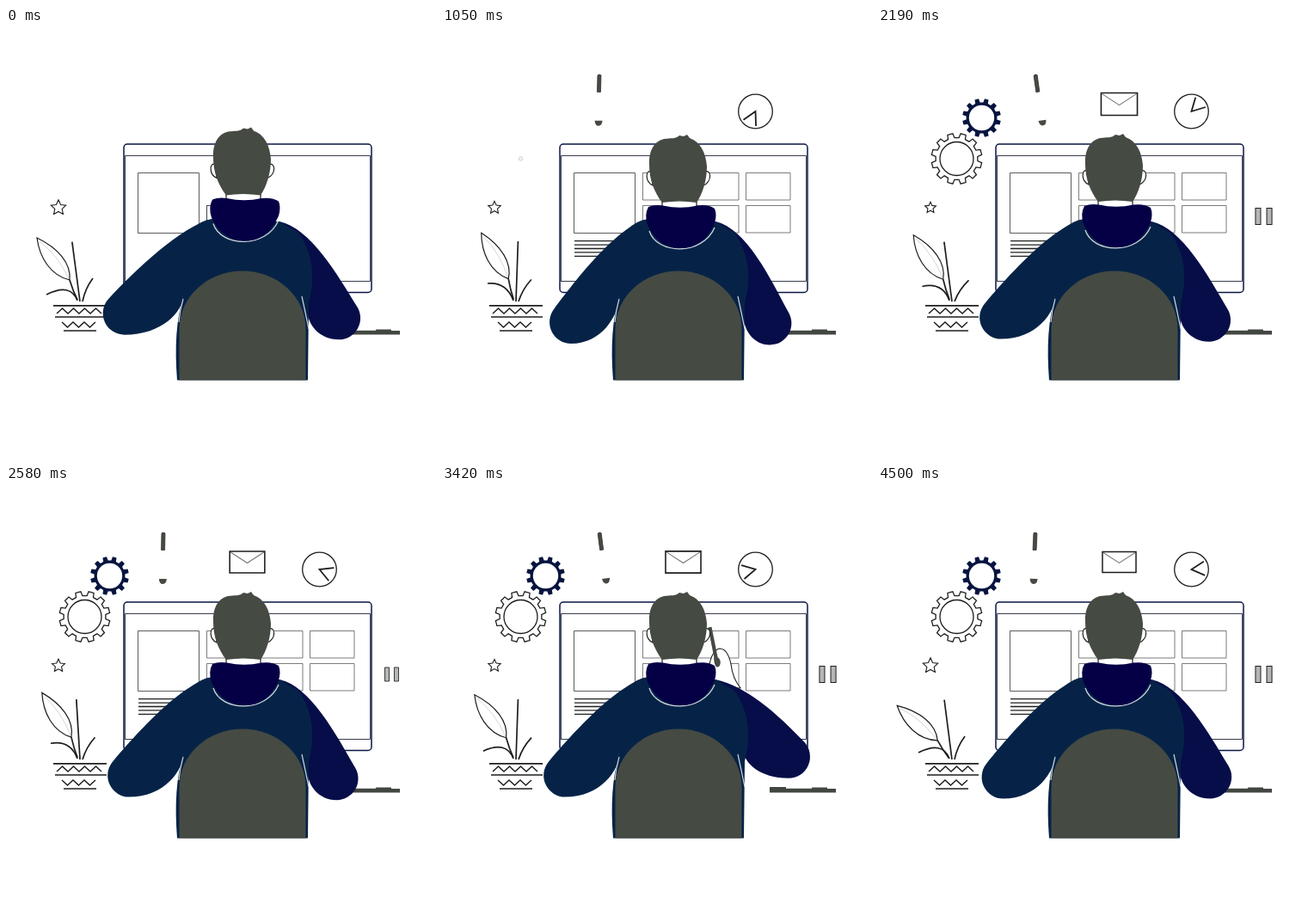
An HTML page with a canvas for the animation above (4.53 s loop, 500 by 500 pixels).

```html
<!DOCTYPE html>
<html lang="en">
<head>
<meta charset="utf-8">
<title>Working at a desk</title>
<style>
  html, body { margin: 0; width: 100%; height: 100%; overflow: hidden; background: #fff; }
  canvas { display: block; }
</style>
</head>
<body>
<canvas id="stage" width="500" height="500"></canvas>
<script>
const ctx = document.getElementById('stage').getContext('2d');
const LOOP = 4530, STEP = 30, RAD = Math.PI / 180;
const INK = '#1c1f1e', GREY = '#454a43', NAVY = '#062347', HOOD = '#050046', SLEEVE = '#060d48', SEAM = '#cdd5de';

const clamp = x => Math.max(0, Math.min(1, x));
const smooth = x => { x = clamp(x); return x * x * (3 - 2 * x); };
const lerp = (a, b, k) => a + (b - a) * k;
// Rises and falls between 0 and 1; shared by everything that breathes
const pulse = t => Math.sin(Math.PI * t / 1485) ** 2;
const popIn = (t, start) => smooth((t - start) / 280);

// Eased value through [time, value] pairs
function at(t, ...keys) {
  const i = keys.findIndex(k => k[0] > t);
  if (i < 0) return keys[keys.length - 1][1];
  if (i === 0) return keys[0][1];
  const [t0, a] = keys[i - 1], [t1, b] = keys[i];
  return lerp(a, b, smooth((t - t0) / (t1 - t0)));
}

function draw(d, { fill, stroke, width = 1.2 }) {
  const path = new Path2D(d);
  if (fill) { ctx.fillStyle = fill; ctx.fill(path); }
  if (stroke) { ctx.strokeStyle = stroke; ctx.lineWidth = width; ctx.stroke(path); }
}
const line = (d, width = 1.7, stroke = INK) => draw(d, { stroke, width });
const box = (x, y, w, h) => `M${x} ${y}h${w}v${h}h${-w}z`;
const circle = r => `M${r} 0a${r} ${r} 0 1 1 ${-2 * r} 0a${r} ${r} 0 1 1 ${2 * r} 0z`;
const polygon = points => 'M' + points.join('L') + 'Z';
const polar = (r, angle) => [r * Math.sin(angle), -r * Math.cos(angle)];
const zigzag = (x, y, count, rise) =>
  `M${x} ${y}` + Array.from({ length: count }, (_, i) => `l6.5 ${i % 2 ? -rise : rise}`).join('');

function place(x, y, angle, scale, paint) {
  if (scale <= 0) return;
  ctx.save();
  ctx.translate(x, y);
  ctx.rotate(angle * RAD);
  ctx.scale(scale, scale);
  paint();
  ctx.restore();
}

function monitor(t) {
  ctx.beginPath();
  ctx.roundRect(137, 135, 288, 172.5, 4);
  ctx.strokeStyle = '#0a1645';
  ctx.lineWidth = 1.5;
  ctx.stroke();
  line('M138.5 294V148.5H423.5V294.5H138', .9, '#222638');
  line(box(153.5, 168.5, 71, 70), .8, '#333');

  // Cards fan out from the lower left one
  const spread = smooth(t / 700);
  for (let row = 0; row < 2; row++)
    for (let col = 0; col < 3; col++)
      line(box(233.5 + 60 * col * spread, 206.5 - 38 * (1 - row) * spread, 51.5, 31.5), .7, '#444');

  for (let i = 0; i < 5; i++) {
    const grown = clamp((t - 342 - 78 * i) / 300);
    if (grown) line(`M154 ${247.7 + 4.4 * i}h${51 * grown}`, 1.3);
  }
}

function plant(t) {
  const tilt = at(t, [0, 0], [600, 11.5], [1470, 3.4], [2970, 4.6], [3870, -1.8], [4500, -11.5]);
  place(86, 318, tilt, 1, () => {
    draw('M-50-74C-47-51-34-30-12-25C-10-44-25-62-50-74Z', { fill: '#fff', stroke: INK });
    line('M-47-70Q-26-54-13-27', .6, '#bbb');
    line('M-12-25Q-8-12-3-2');
  });
  place(86, 318, 2 - 9.5 * Math.cos(Math.PI * t / 2215) ** 4, 1, () => line('M0 0V-70'));
  place(89, 318, 10 * pulse(t), 1, () => line('M0 0Q3-15 12-27'));
  const raised = smooth(tilt / 6);
  line(`M${47 + 6 * raised} ${310 - 13 * raised}Q75 ${296 - raised} 83 317`);

  line('M55 322.8H117M57 336H117M67 352H105');
  line(zigzag(59, 332, 8, -6) + zigzag(65, 342, 6, 6), 1.5);
}

function star(t) {
  const r = 9.2 - 2.5 * pulse(t);
  place(61, 209, 0, 1, () =>
    line(polygon(Array.from({ length: 10 }, (_, i) => polar(i % 2 ? r * .48 : r, i * 36 * RAD))), 1.1));
}

function gear(outer, root, teeth = 12) {
  const points = [];
  for (let i = 0; i < teeth; i++)
    for (const f of [-.3, -.2, .2, .3])
      points.push(polar(Math.abs(f) < .25 ? outer : root, (i + .5 + f) * 2 * Math.PI / teeth));
  return polygon(points);
}

function icons(t) {
  place(91.5, 152, 0, popIn(t, 1000), () => line(gear(29.5, 24.5) + circle(19.5), 1.3));
  place(120.5, 104.5, 0, popIn(t, 1600), () => {
    draw(gear(22.5, 18), { fill: '#06143f' });
    draw(circle(14.7), { fill: '#fff' });
  });

  place(364.5, 97, 0, popIn(t, 230), () => {
    line(circle(19.8), 1.3);
    place(0, 0, 100 + .1736 * (t - 600), 1, () => line('M0-17V0L14.3-9.3', 1.8));
  });

  const swing = at(t, [1470, 1], [2190, -8.5], [2970, 9.8], [3420, -8], [3870, 10], [4500, 2]);
  place(183, 54, swing, popIn(t, 780), () => {
    draw('M-2 1Q0-1 2 1L1.8 20.5H-2.2Z', { fill: GREY, stroke: '#30332f', width: .8 });
    draw('M-4.5 54H4.5Q4 60 0 60Q-4 60-4.5 54Z', { fill: GREY });
  });

  place(280.5, 88.5, 0, popIn(t, 1720) * (1 + .08 * pulse(t)), () => {
    line('M-18.5-11L0 1L18.5-11', 1, '#777');
    line(box(-19.5, -12, 39, 24), 1.5);
  });

  const beat = .88 + .13 * Math.cos(2 * Math.PI * (t - 2240) / 1155);
  place(448.5, 219, 0, popIn(t, 1850) * beat, () =>
    draw(box(-9.5, -9.5, 6, 19) + box(3.5, -9.5, 6, 19), { fill: '#b5b7b5', stroke: INK, width: 1 }));
}

function tablet() {
  draw('M381 350h19v1.8h30v-1.2h18v1.4h10v4.6h-77z', { fill: '#424741' });
}

function hand(t) {
  const drop = at(t, [2450, 85], [2970, 0], [3870, -5], [4280, 85]);
  if (drop >= 85) return;
  const lean = smooth((t - 2970) / 900);
  place(324 - 9 * lean, 205 + drop, -12 * lean, 1, () => {
    draw('M-10 35V7C-7-3-2-13 5-13C12-12 15-3 16 7C16 17 18 26 24 35Z', { fill: '#fff', stroke: INK, width: 1.1 });
    line('M-4-39L0 4', 4.2, GREY);
    draw('M-3-3Q4-5 4 3Q3 9-1 8Q-4 5-3-3Z', { fill: GREY });
  });
}

// Upper arm from shoulder (sx, sy) to a round elbow, back to the armpit; side is -1 left, 1 right
function arm(side, sx, sy, angle, reach, pitX, pitY, fill) {
  const r = 25, cos = side * Math.cos(angle * RAD), sin = Math.sin(angle * RAD);
  const ex = sx + reach * cos, ey = sy + reach * sin, low = ey + r;
  const ox = ex + side * r * sin, oy = ey - side * r * cos;
  pitY ??= ey - 6;
  draw(`M${sx} ${sy}C${sx + side * 36} ${sy + 8} ${ox - 45 * cos} ${oy - 45 * sin} ${ox} ${oy}
    A${r} ${r} 0 0 ${side > 0 ? 1 : 0} ${ex} ${low}
    C${lerp(ex, pitX, .65)} ${low} ${pitX} ${lerp(pitY, low, .4)} ${pitX} ${pitY}L${sx} 300Z`, { fill });
}

function person(t) {
  const bob = at(t, [0, -7.5], [600, 2], [1470, 0]);
  const left = at(t, [0, 47], [600, 55], [1470, 51.5], [2190, 49.8], [3870, 49.8], [4500, 51]);
  const right = at(t, [0, 58.4], [600, 65], [1470, 59], [2600, 60], [3700, 44], [3870, 44], [4320, 59]);

  arm(1, 318, 225, right, 91 + .7 * right, 351, undefined, SLEEVE);
  arm(-1, 240, 222, left, 150, 206, 311, NAVY);
  draw('M199 409.5C196 370 198 340 206 311L215 235Q225 224 240 222L318 225L340 238C357 262 360 290 352 320L351 409.5Z', { fill: NAVY });
  line('M206 315Q202 329 201 342M344 312Q348 330 352 350', 1.2, SEAM);
  draw('M201.5 409.5V350C201.5 312 235 282.5 275 282.5S348.5 312 348.5 350V409.5Z', { fill: GREY });

  place(0, bob, 0, 1, () => {
    draw('M244 166C236 163 236 178 245 182ZM305 166C314 163 314 178 304 182Z', { fill: '#fff', stroke: INK });
    draw('M256 195V210H296V195Z', { fill: '#fff', stroke: INK });
    draw('M256 202C247 190 241 176 241 158C240 143 246 131 258 128C266 127 272 128 276 124L281 125L285 123L288 127C300 131 307 144 308 160C308 176 303 192 296 202Q276 199 256 202Z', { fill: GREY });
    line('M241 235C250 263 303 264 317 231', 1.3, SEAM);
    draw('M240 207Q247 204 257 205.5Q277 210 297 205.5Q310 204 317 209Q320 216 317 226C308 245 296 255 279 255C262 255 248 247 239 228Q235 216 240 207Z', { fill: HOOD });
  });
}

function render(now) {
  const t = Math.floor(now % LOOP / STEP) * STEP;
  ctx.fillStyle = '#fff';
  ctx.fillRect(0, 0, 500, 500);
  for (const part of [monitor, plant, star, icons, tablet, hand, person]) part(t);
}

let start;
function tick(now) {
  start ??= now;
  render(Math.max(0, now - start));
  requestAnimationFrame(tick);
}
render(0);
requestAnimationFrame(tick);
</script>
</body>
</html>
```
